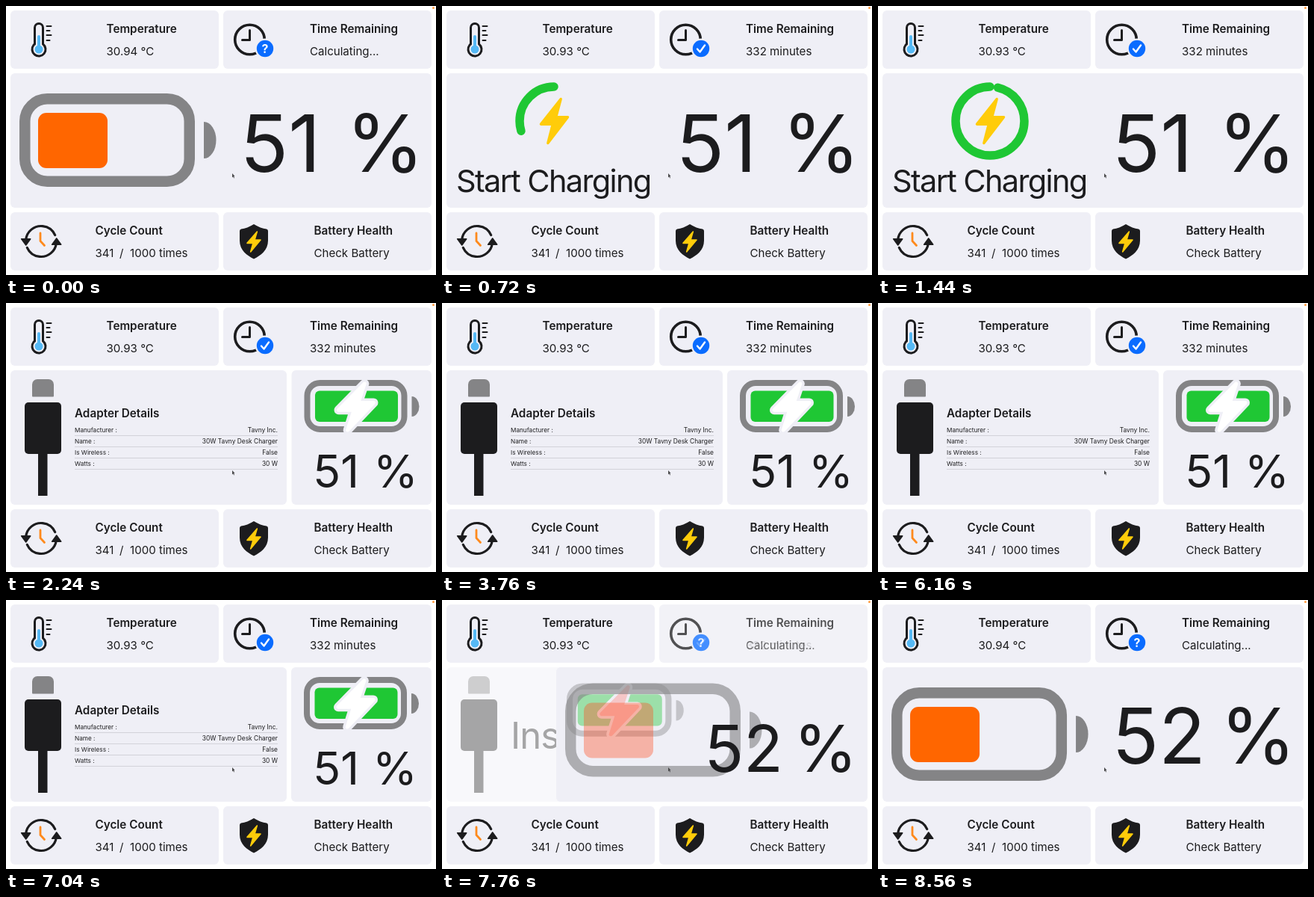
An HTML page with a canvas that plays this animation: 576x360 px, repeating every 8.64 s.

```html
<!DOCTYPE html>
<html lang="en">
<head>
<meta charset="utf-8">
<title>Battery dashboard</title>
<style>
html, body { margin: 0; width: 100%; height: 100%; overflow: hidden; background: #fff; }
canvas { display: block; width: 576px; height: 360px; }
</style>
</head>
<body>
<canvas id="stage" width="576" height="360"></canvas>
<script>
const LOOP = 8640, STEP = 80;
const INK = '#1c1c1e', PANEL = '#efeff6', GRAY = '#848486';
const GREEN = '#1fc734', BLUE = '#0a6cff', YELLOW = '#ffcc0a';
const RED = [255, 59, 48], ORANGE = [255, 102, 0], WHITE = [255, 255, 255];
const PLUG_IN = 320, SHOW_ADAPTER = 1500, UNPLUG = 7600, NEW_READING = 8240;

const stage = document.getElementById('stage').getContext('2d');
const layer = document.createElement('canvas');
layer.width = 576;
layer.height = 360;
const layerCtx = layer.getContext('2d');
let g = stage;

const clamp = v => Math.max(0, Math.min(1, v));
const mix = (a, b, p) => a + (b - a) * p;
const blend = (from, to, p) => `rgb(${from.map((c, i) => Math.round(mix(c, to[i], clamp(p))))})`;

// Damped spring from 0 to 1, response 0.55 s, damping 0.825.
function spring(ms) {
  if (ms <= 0) return 0;
  const s = ms / 1000, zeta = 0.825, w = 2 * Math.PI / 0.55;
  const wd = w * Math.sqrt(1 - zeta * zeta);
  return 1 - Math.exp(-zeta * w * s) * (Math.cos(wd * s) + zeta * w / wd * Math.sin(wd * s));
}

// Draws a group as one layer, so overlapping parts fade together.
function fade(alpha, draw) {
  alpha = clamp(alpha);
  if (alpha < 0.004) return;
  layerCtx.clearRect(0, 0, 576, 360);
  g = layerCtx;
  draw();
  g = stage;
  g.globalAlpha = alpha;
  g.drawImage(layer, 0, 0);
  g.globalAlpha = 1;
}

function at(x, y, scale, draw) {
  g.save();
  g.translate(x, y);
  g.scale(scale, scale);
  draw();
  g.restore();
}

function box(x, y, w, h, r, color) {
  g.fillStyle = color;
  g.beginPath();
  g.roundRect(x, y, w, h, r);
  g.fill();
}

const tile = (x, y) => box(x, y, 279, 78, 6, PANEL);

function disc(x, y, r, color) {
  g.fillStyle = color;
  g.beginPath();
  g.arc(x, y, r, 0, 2 * Math.PI);
  g.fill();
}

function pen(color, width) {
  g.strokeStyle = color;
  g.lineWidth = width;
  g.lineCap = g.lineJoin = 'round';
}

function trace(points, close) {
  g.beginPath();
  points.forEach(([x, y]) => g.lineTo(x, y));
  if (close) g.closePath();
}

function line(points, color, width) {
  pen(color, width);
  trace(points);
  g.stroke();
}

function shape(points, color, round = 0) {
  trace(points, true);
  g.fillStyle = color;
  g.fill();
  if (round) {
    pen(color, round);
    g.stroke();
  }
}

function text(str, x, y, size, { weight = 400, align = 'left', track = 0, color = INK } = {}) {
  g.font = `${weight} ${size}px Inter, sans-serif`;
  g.letterSpacing = `${track * size}px`;
  g.textAlign = align;
  g.fillStyle = color;
  g.fillText(str, x, y);
}

const title = (str, x, y) => text(str, x, y, 15.25, { weight: 600 });
const value = (str, x, y) => text(str, x, y, 15.1);

const bolt = (x, y, w, h) =>
  [[0.74, 0], [0, 0.57], [0.44, 0.57], [0.26, 1], [1, 0.41], [0.56, 0.41]]
    .map(([u, v]) => [x + u * w, y + v * h]);

function temperature(reading) {
  tile(6, 6);
  pen(INK, 3);
  g.beginPath();
  g.moveTo(38.5, 51);
  g.lineTo(38.5, 29);
  g.arc(44, 29, 5.5, Math.PI, 0);
  g.lineTo(49.5, 51);
  g.arc(44, 58, 9, -0.9, Math.PI + 0.9);
  g.closePath();
  g.stroke();
  line([[44, 41], [44, 57]], '#55b9f5', 4);
  disc(44, 58, 5.5, '#55b9f5');
  [27, 33, 39, 46].forEach((y, i) => line([[54.5, y], [i % 2 ? 58.5 : 60.5, y]], INK, 2));
  title('Temperature', 134.5, 36);
  value(`${reading} °C`, 134.5, 66);
}

function timeRemaining(known) {
  tile(291, 6);
  pen(INK, 3.6);
  g.beginPath();
  g.arc(326.5, 45, 19.8, 0, 2 * Math.PI);
  g.stroke();
  line([[326.5, 32.5], [326.5, 45.5], [316.5, 45.5]], INK, 3);
  disc(347, 57, 13.5, PANEL);
  disc(347, 57, 11.2, BLUE);
  if (known) line([[342, 57.5], [345.5, 61.5], [352, 52.5]], '#fff', 2.4);
  else text('?', 347, 63, 16, { weight: 700, align: 'center', color: '#fff' });
  title('Time Remaining', 407, 36);
  value(known ? '332 minutes' : 'Calculating...', 407, 66);
}

function cycleCount() {
  tile(6, 276);
  pen(INK, 3.2);
  [Math.PI, 0].forEach(start => {
    g.beginPath();
    g.arc(47, 315, 20.5, start + 0.1, start + Math.PI - 0.42);
    g.stroke();
  });
  shape([[20.7, 311.7], [32.7, 311.7], [26.7, 320]], INK, 1.6);
  shape([[61.7, 319.3], [73.7, 319.3], [67.7, 311]], INK, 1.6);
  line([[46, 304], [46, 314.5], [51.5, 320.5]], '#ff8a1c', 2.8);
  title('Cycle Count', 119.5, 306);
  value('341', 119.5, 336);
  value('/', 152, 336);
  value('1000 times', 166, 336);
}

function batteryHealth() {
  tile(291, 276);
  g.fillStyle = INK;
  g.beginPath();
  g.moveTo(332, 292);
  g.quadraticCurveTo(341, 297.5, 349, 298.5);
  g.quadraticCurveTo(351, 299, 351, 301);
  g.lineTo(351, 314);
  g.bezierCurveTo(351, 327, 341, 334, 332, 338.5);
  g.bezierCurveTo(323, 334, 313, 327, 313, 314);
  g.lineTo(313, 301);
  g.quadraticCurveTo(313, 299, 315, 298.5);
  g.quadraticCurveTo(323, 297.5, 332, 292);
  g.fill();
  shape(bolt(323, 302, 18, 27), YELLOW, 1.6);
  title('Battery Health', 412.5, 306);
  value('Check Battery', 412.5, 336);
}

function cell(x, y, w, h, r, weight) {
  pen(GRAY, weight);
  g.beginPath();
  g.roundRect(x + weight / 2, y + weight / 2, w - weight, h - weight, r);
  g.stroke();
}

function cap(x, y, rx, ry) {
  g.fillStyle = GRAY;
  g.beginPath();
  g.ellipse(x, y, rx, ry, 0, -Math.PI / 2, Math.PI / 2);
  g.fill();
}

// The charge bar lags behind the outline and warms from red to orange.
function lowBattery(shown) {
  cell(12, 117, 235, 125, 30, 14.5);
  cap(259, 179.5, 16.5, 24.5);
  g.globalAlpha = clamp(shown);
  box(37, 143, 93, 74, 11, blend(RED, ORANGE, shown * shown));
  g.globalAlpha = 1;
}

function chargingBattery(tint) {
  cell(0, 0, 138, 70, 17, 8);
  cap(144, 35.5, 10, 13.5);
  box(14.5, 14.5, 111, 41.5, 6, GREEN);
  const points = bolt(46, 5, 47, 62);
  g.globalCompositeOperation = 'destination-out';
  shape(points, '#000', 12);
  g.globalCompositeOperation = 'source-over';
  shape(points, blend(WHITE, RED, tint), 5);
}

function startCharging(done) {
  pen(GREEN, 11.5);
  if (done > 0) {
    g.beginPath();
    g.arc(144, 154, 46, -Math.PI / 2, -Math.PI / 2 - 2 * Math.PI * Math.min(done, 1), true);
    g.stroke();
  }
  shape(bolt(126.5, 124.5, 36, 59), YELLOW, 3.5);
  text('Start Charging', 13, 249, 41.5, { track: -0.04 });
}

function adapter(plugged) {
  box(6, 90, 370, 180, 6, PANEL);
  box(35, 102, 29, 23.5, [7, 7, 1, 1], GRAY);
  box(25, 133, 49, 69, 5, INK);
  box(43, 200, 12.5, 58, 0, INK);
  if (!plugged) {
    text('Insert Plug', 92, 199, 49, { track: -0.02 });
    return;
  }
  title('Adapter Details', 92, 153);
  const rows = [
    ['Manufacturer', 'Tavny Inc.'],
    ['Name', '30W Tavny Desk Charger'],
    ['Is Wireless', 'False'],
    ['Watts', '30 W'],
  ];
  rows.forEach(([key, val], i) => {
    const y = 173.3 + i * 14.8;
    text(`${key} :`, 92, y, 8.2);
    text(val, 364, y, 8.4, { align: 'right' });
    box(92, Math.round(y + 4), 272, 0.7, 0, '#c9c9cf');
  });
}

// Digits keep their ink on the left edge, the sign on the right edge.
function percent(level, split) {
  const [wideSize, wideBase] = level > 51 ? [103, 219] : [106.5, 222];
  const size = mix(wideSize, 61, split), y = mix(wideBase, 247, split);
  const left = mix(321, 415, split), right = mix(548.5, 545, split);
  g.font = `400 ${size}px Inter, sans-serif`;
  g.letterSpacing = '0px';
  g.textAlign = 'left';
  g.fillStyle = INK;
  const digits = String(level);
  g.fillText(digits, left + g.measureText(digits).actualBoundingBoxLeft, y);
  g.fillText('%', right - g.measureText('%').actualBoundingBoxRight, y);
}

function mainPanel(t) {
  const plug = spring(t - PLUG_IN), unplug = spring(t - UNPLUG);
  const split = spring(t - SHOW_ADAPTER) - unplug;
  const off = t >= UNPLUG;
  const left = 6 + 376 * split;
  const low = off ? unplug : 1 - plug;

  fade(split, () => adapter(!off));
  box(left, 90, 570 - left, 180, 6, PANEL);

  g.save();
  g.beginPath();
  g.rect(left, 90, 570 - left, 180);
  g.clip();
  fade(split, () => at(left + mix(12, 17, split), mix(117, 103, split),
    mix(1.03, 1, split), () => chargingBattery(unplug)));
  if (!off) {
    fade(plug * (1 - split), () => at(left, 0, 1, () => startCharging((t - 400) / 1080)));
  }
  fade(low, () => at(left, -14 * split, 1, () => lowBattery(low)));
  g.restore();
  percent(off ? 52 : 51, split);
}

function render(t) {
  const known = clamp(spring(t - PLUG_IN) - spring(t - UNPLUG));
  box(0, 0, 576, 360, 0, '#fff');
  temperature(t < 400 || t >= NEW_READING ? '30.94' : '30.93');
  fade(known, () => timeRemaining(true));
  fade(1 - known, () => timeRemaining(false));
  cycleCount();
  batteryHealth();
  mainPanel(t);
  shape([[303, 224], [303, 229.5], [304.3, 228.5], [305.3, 230.5], [306, 230], [305.2, 228], [306.5, 227.8]], '#4a4a4c');
  disc(572.5, 2.5, 1.5, '#ff9a3c');
}

const start = performance.now();
function tick() {
  const t = (performance.now() - start) % LOOP;
  render(Math.floor(t / STEP) * STEP);
  requestAnimationFrame(tick);
}
tick();
</script>
</body>
</html>
```
